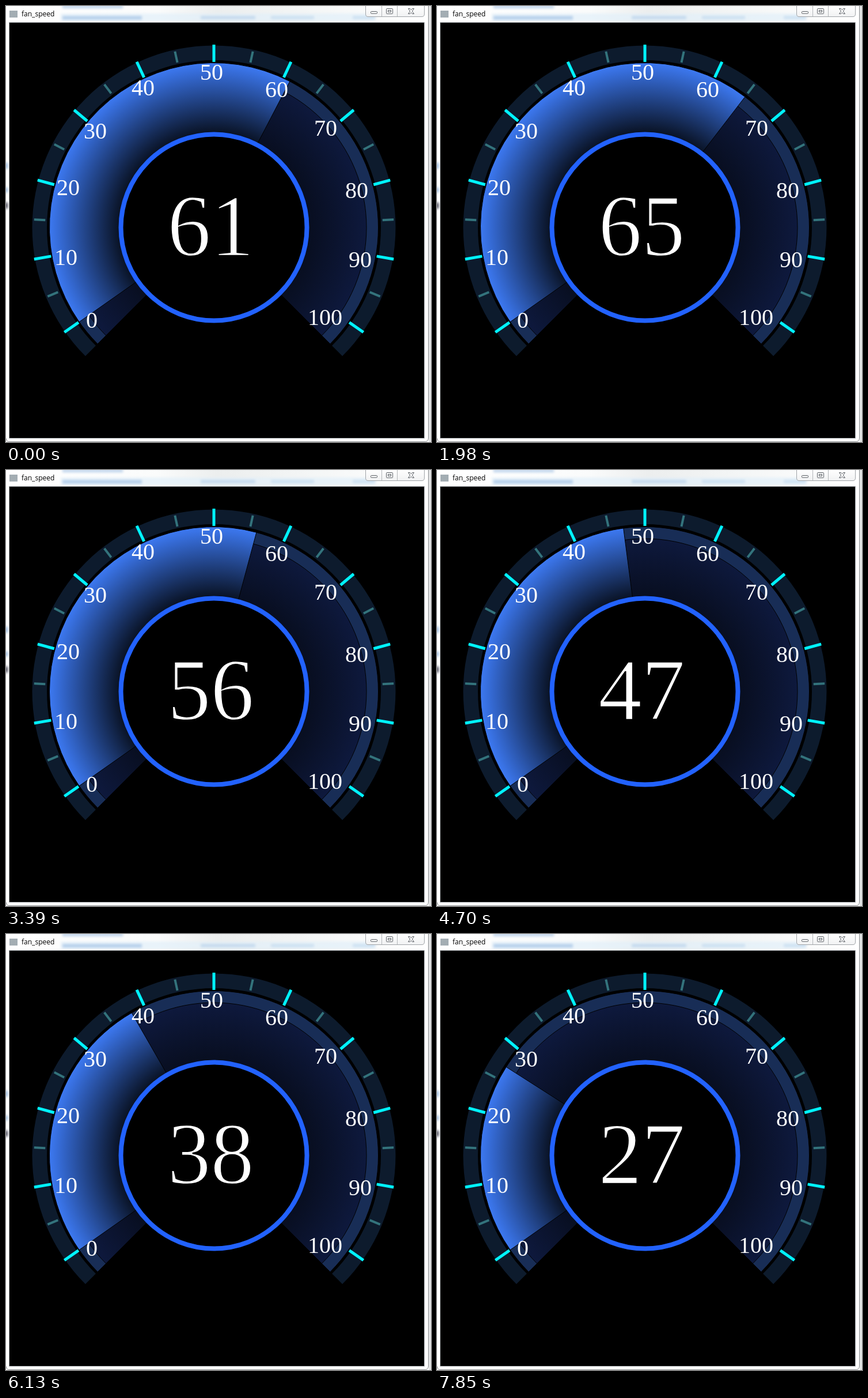
Recreate the animation shown at these times as an HTML page. Size 738 px wide and 756 px high, loop 8000 ms.

```html
<!DOCTYPE html>
<html lang="en">
<head>
<meta charset="utf-8">
<title>Gauge</title>
<style>
  html, body { margin: 0; width: 100%; height: 100%; overflow: hidden; background: #fff; }
  svg { display: block; width: 738px; height: 756px; }
  .digits { font-family: "Liberation Serif", "Times New Roman", serif; fill: #fff; }
  /* the black outline slims the strokes of the large digits */
  #value { font-size: 152px; letter-spacing: -1px; stroke: #000; stroke-width: 2.4px; }
  .title { font: 12px "Open Sans", "Noto Sans", sans-serif; fill: #000; }
</style>
</head>
<body>
<svg viewBox="0 0 738 756" xmlns="http://www.w3.org/2000/svg">
  <defs>
    <radialGradient id="lit" gradientUnits="userSpaceOnUse" cx="361" cy="384" r="285">
      <stop offset=".5" stop-color="#000"/>
      <stop offset="1" stop-color="#3c78f0"/>
    </radialGradient>
    <radialGradient id="dim" gradientUnits="userSpaceOnUse" cx="361" cy="384" r="265">
      <stop offset=".62" stop-color="#080e20"/>
      <stop offset="1" stop-color="#0e193d"/>
    </radialGradient>
    <linearGradient id="bar">
      <stop offset="0" stop-color="#fff"/>
      <stop offset=".36" stop-color="#fafbfb"/>
      <stop offset=".5" stop-color="#eceeee"/>
      <stop offset=".7" stop-color="#f3f5f5"/>
      <stop offset="1" stop-color="#fff"/>
    </linearGradient>
    <linearGradient id="button" x2="0" y2="1">
      <stop offset="0" stop-color="#fff"/>
      <stop offset="1" stop-color="#f1f2f3"/>
    </linearGradient>
    <filter id="soft" x="-20%" y="-100%" width="140%" height="300%"><feGaussianBlur stdDeviation="2.2"/></filter>
  </defs>

  <!-- window frame -->
  <rect width="738" height="756" fill="#fff"/>
  <rect width="733" height="28" fill="url(#bar)"/>
  <g filter="url(#soft)" fill="#9dbfe4">
    <rect x="95" y="13" width="545" height="13" fill="#e2effa" opacity=".7"/>
    <rect x="98" y="-1" width="105" height="5" opacity=".65"/>
    <rect x="98" y="17" width="138" height="7" opacity=".65"/>
    <rect x="338" y="17" width="95" height="6" opacity=".45"/>
    <rect x="460" y="17" width="75" height="6" opacity=".35"/>
    <rect x="602" y="17" width="40" height="6" opacity=".35"/>
    <rect x="-2" y="272" width="5" height="10"/>
    <rect x="-2" y="315" width="5" height="8"/>
    <rect x="-2" y="341" width="5" height="10" fill="#445"/>
  </g>
  <path d="M733.5 0V749Q733.5 755.5 727 755.5H6Q.5 755.5 .5 750" fill="none" stroke="#8b8e91"/>
  <path d="M736 0V756" stroke="#e3e4e5" stroke-width="4"/>
  <rect x="6" y="8" width="14" height="12" fill="#a3adb3"/>
  <text class="title" x="27" y="18">fan_speed</text>
  <path d="M624.5 -1V14Q624.5 18.5 629 18.5H722Q726.5 18.5 726.5 14V-1Z" fill="url(#button)" stroke="#a0a4a8"/>
  <path d="M652.5 0V18M679.5 0V18" stroke="#b4b7ba"/>
  <g fill="#fff" stroke="#565b61">
    <rect x="633.5" y="9.5" width="11" height="3.5" rx="1"/>
    <rect x="660.5" y="4.5" width="11" height="9" rx="1"/>
    <rect x="663.5" y="7.5" width="5" height="3"/>
    <path d="M698.5 4.5H701.5L703.5 6.8L705.5 4.5H708.5L705.3 9L708.5 13.5H705.5L703.5 11.2L701.5 13.5H698.5L701.7 9Z"/>
  </g>
  <rect x="5.5" y="28.5" width="721" height="721" stroke="#a8acb0"/>

  <!-- gauge -->
  <path id="rim" fill="#0d1b2d"/>
  <path id="band" fill="#182d56" stroke="#000"/>
  <path id="face" fill="url(#dim)" stroke="#000"/>
  <path id="level" fill="url(#lit)" stroke="#000"/>
  <circle cx="361" cy="384" r="161.5" fill="#000" stroke="#2262ff" stroke-width="8"/>
  <path id="minor" stroke="#33737c" stroke-width="4"/>
  <path id="major" stroke="#00f3ff" stroke-width="5"/>
  <g id="labels" class="digits" font-size="40"></g>
  <text id="value" class="digits" x="280" y="433"></text>
</svg>
<script>
const CX = 361, CY = 384, LOOP = 8000;
const PIE = 285.5;
const $ = id => document.getElementById(id);
const setPath = (id, d) => $(id).setAttribute("d", d);

// Angles are in degrees, clockwise from the top.
function point(r, deg) {
  const a = deg * Math.PI / 180;
  return (CX + r * Math.sin(a)).toFixed(2) + " " + (CY - r * Math.cos(a)).toFixed(2);
}
const angleOf = value => (value - 50) * 2.5;
const arc = (r, from, to) =>
  `A${r} ${r} 0 ${Math.abs(to - from) > 180 ? 1 : 0} ${to > from ? 1 : 0} ${point(r, to)}`;
const pie = (r, from, to) => `M${CX} ${CY}L${point(r, from)}${arc(r, from, to)}Z`;
const tick = (r1, r2, value) => `M${point(r1, angleOf(value))}L${point(r2, angleOf(value))}`;

setPath("rim", `M${point(315.5, -135)}${arc(315.5, -135, 135)}L${point(290, 135)}${arc(290, 135, -135)}Z`);
setPath("band", pie(PIE, -135, 135));
setPath("face", pie(265, -135, 135));

let major = "", minor = "";
for (let v = 0; v <= 100; v += 10) {
  major += tick(287, 317, v);
  if (v < 100) minor += tick(293, 312.5, v + 5);
}
setPath("major", major);
setPath("minor", minor);

const labelSpots = [
  [139, 558], [84, 449], [88, 328], [135, 230], [218, 155], [337, 128],
  [450, 158], [535, 225], [589, 333], [595, 453], [524, 553]
];
$("labels").innerHTML = labelSpots
  .map(([x, y], i) => `<text x="${x}" y="${y}">${i * 10}</text>`).join("");

// Times at which the reading reaches a value; whole steps lie evenly between.
const keys = [
  [0, 61], [70, 62], [990, 68], [1150, 69], [1520, 68], [1980, 65], [2060, 64],
  [2530, 61], [2760, 60], [3390, 56], [3450, 55], [3770, 53], [3920, 52],
  [4700, 47], [4870, 46], [5020, 45], [5480, 42], [5720, 41], [5960, 39],
  [6130, 38], [6900, 33], [7130, 32], [7210, 31], [7850, 27], [LOOP, 27]
];

function reading(t) {
  let i = 0;
  while (i < keys.length - 2 && t >= keys[i + 1][0]) i++;
  const [t0, v0] = keys[i], [t1, v1] = keys[i + 1];
  const steps = Math.floor(Math.abs(v1 - v0) * (t - t0) / (t1 - t0) + 1e-6);
  return v0 + Math.sign(v1 - v0) * steps;
}

let shown;
function draw(t) {
  const v = reading(t);
  if (v === shown) return;
  shown = v;
  setPath("level", pie(PIE, angleOf(0), angleOf(v)));
  $("value").textContent = v;
}

function loop() {
  draw(performance.now() % LOOP);
  requestAnimationFrame(loop);
}
loop();
</script>
</body>
</html>
```
